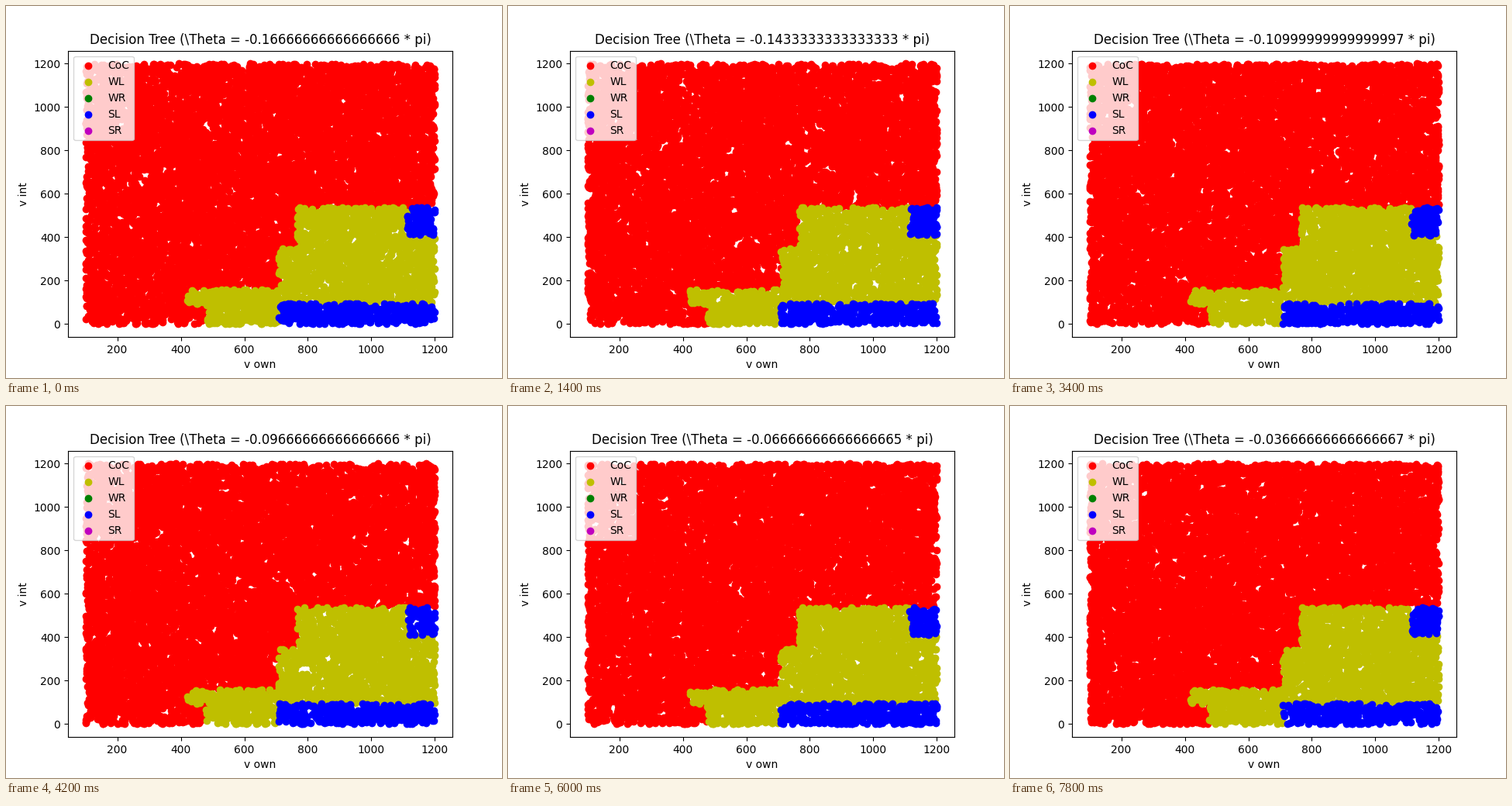
These frames come from a looping animation (640x480 px, 8 s). A matplotlib script:

```python
import math

import numpy as np
import matplotlib.pyplot as plt
from matplotlib.animation import FuncAnimation

FRAMES = 40
INTERVAL = 200
SAMPLES = 10000
CLASSES = [("CoC", "r"), ("WL", "y"), ("WR", "g"), ("SL", "b"), ("SR", "m")]
COC, WL, WR, SL, SR = range(5)


def classify(own, intr):
    """Axis-aligned splits of the tree; later rules override earlier ones."""
    label = np.full(own.shape, COC)
    label[(own > 418) & (intr > 93) & (intr < 159)] = WL
    label[(own > 477) & (intr < 159)] = WL
    label[(own > 708) & (intr < 348)] = WL
    label[(own > 766) & (intr < 538)] = WL
    label[(own > 708) & (intr < 95)] = SL
    label[(own > 1114) & (intr > 410) & (intr < 538)] = SL
    return label


fig, ax = plt.subplots(figsize=(6.4, 4.8), dpi=100)
dots = [ax.scatter([], [], color=color, label=name) for name, color in CLASSES]
ax.set_xlim(45, 1255)
ax.set_ylim(-60, 1260)
ax.set_xlabel("v own")
ax.set_ylabel("v int")
ax.legend(loc="upper left")
title = ax.set_title("")


def update(i):
    theta = -math.pi / 6 + i * math.pi / 300
    title.set_text(rf"Decision Tree (\Theta = {theta / math.pi} * pi)")
    rng = np.random.default_rng(100 + i)
    points = rng.uniform((100, 0), (1200, 1200), (SAMPLES, 2))
    label = classify(*points.T)
    for k, dot in enumerate(dots):
        dot.set_offsets(points[label == k])
    return [title, *dots]


anim = FuncAnimation(fig, update, frames=FRAMES, interval=INTERVAL,
                     repeat=True, repeat_delay=0)
plt.show()
```
